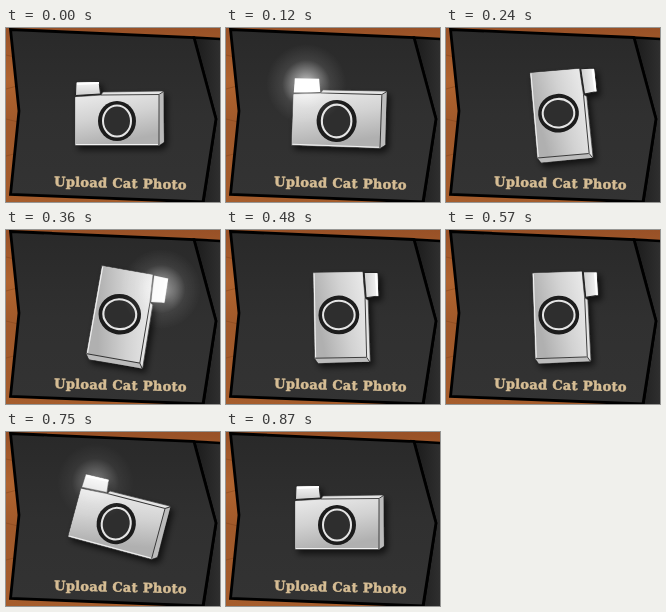
An HTML page that plays this animation: 214 by 174 pixels, repeating every 0.9 s.

```html
<!DOCTYPE html>
<html lang="en">
<head>
<meta charset="utf-8">
<title>Upload button</title>
<style>
html, body { margin: 0; width: 100%; height: 100%; overflow: hidden; background: #2f2f2f; }
svg { display: block; width: 100vw; height: 100vh; }
text { font: bold 13px "DejaVu Serif", "Noto Serif", serif; letter-spacing: .3px; }
</style>
</head>
<body>
<svg viewBox="0 0 214 174" preserveAspectRatio="none">
  <defs>
    <linearGradient id="wood" x2="0" y2="1">
      <stop offset="0" stop-color="#985127"/><stop offset=".3" stop-color="#b0642f"/>
      <stop offset=".55" stop-color="#a0592a"/><stop offset="1" stop-color="#a65d2c"/>
    </linearGradient>
    <linearGradient id="panel" x2="0" y2="1">
      <stop offset="0" stop-color="#292929"/><stop offset=".5" stop-color="#303030"/><stop offset="1" stop-color="#333"/>
    </linearGradient>
    <linearGradient id="next">
      <stop offset="0" stop-color="#1b1b1b"/><stop offset="1" stop-color="#303030"/>
    </linearGradient>
    <linearGradient id="metal" x2=".3" y2="1">
      <stop offset="0" stop-color="#ebebeb"/><stop offset=".5" stop-color="#d2d2d2"/>
      <stop offset="1" stop-color="#b0b0b0"/>
    </linearGradient>
    <linearGradient id="bulb" x2="0" y2="1">
      <stop offset="0" stop-color="#f7f7f7"/><stop offset="1" stop-color="#cfcfcf"/>
    </linearGradient>
    <radialGradient id="light">
      <stop offset="0" stop-color="#fff"/><stop offset=".3" stop-color="#fff" stop-opacity=".55"/>
      <stop offset=".6" stop-color="#fff" stop-opacity=".13"/><stop offset="1" stop-color="#fff" stop-opacity="0"/>
    </radialGradient>
    <filter id="shade" x="-30%" y="-30%" width="160%" height="160%">
      <feDropShadow dx="3" dy="4" stdDeviation="3" flood-color="#000" flood-opacity=".65"/>
    </filter>
  </defs>

  <rect width="214" height="174" fill="url(#wood)"/>
  <path d="M0 27L9 29M0 61L11 58M0 91L12 94M0 128L8 126" stroke="#7c4117" stroke-width=".7" opacity=".6"/>
  <path d="M188 9.500L216 11V176H197L210 91Z" fill="url(#next)" stroke="#000" stroke-width="2.500"/>
  <path d="M4.500 1.500L188 9.500L210 91L197 174L4.500 166.500L13 83Z" fill="url(#panel)" stroke="#000" stroke-width="2.800"/>

  <g filter="url(#shade)">
    <g id="camera">
      <path d="M70 54L93 53.500L94.500 66L69.500 67.500Z" fill="url(#bulb)" stroke="#222"/>
      <path d="M71 54.500L93 54V56L71 57Z" fill="#fff"/>
      <path d="M69 69L95 67L97 64L157 63L158 114L153 117.500H69Z" fill="#e4e4e4" stroke="#333" stroke-width=".6"/>
      <path d="M69.500 69L153 67V117H69.500Z" fill="url(#metal)"/>
      <path d="M153 67L157.500 63.500V114L153 117Z" fill="#bcbcbc"/>
      <path d="M95 67L153 66.500L157.500 63.500M153 67V117" fill="none" stroke="#333" stroke-width=".9"/>
      <path d="M70 116.500H152" stroke="#f2f2f2"/>
      <ellipse cx="111" cy="93" rx="19" ry="20" fill="#1b1b1b"/>
      <ellipse cx="111" cy="93" rx="14" ry="15.500" fill="#2d2d2d" stroke="#e4e4e4" stroke-width="2"/>
    </g>
  </g>
  <g id="flash">
    <circle cx="81" cy="59" r="38" fill="url(#light)" opacity=".75"/>
    <path d="M70 54L93 53.500L94.500 66L69.500 67.500Z" fill="#fff"/>
  </g>

  <text x="48" y="158" transform="rotate(1.500 48 158)" fill="#d6bd94" stroke="#d6bd94" stroke-width=".5">Upload Cat Photo</text>
</svg>
<script>
const LOOP = 900, STEP = 30, CX = 116, CY = 90;
const camera = document.getElementById("camera");
const flash = document.getElementById("flash");

// time, angle, scale, flash
const keys = [
  [0, 0, 1, 0], [60, 0, 1.02, .4], [120, 2, 1.055, 1], [180, 28, 1.02, .3],
  [240, 85, 1.02, 0], [300, 97, 1.04, .4], [360, 100, 1.065, .9], [420, 96, 1.04, .4],
  [480, 89, 1.02, 0], [570, 88, 1.02, 0], [660, 70, 1.01, 0], [720, 28, 1.01, .2],
  [780, 2, 1.05, .9], [840, 0, 1.01, .2], [870, 0, 1, 0], [900, 0, 1, 0]
];

function pose(t) {
  const i = keys.findIndex(k => k[0] > t);
  const a = keys[i - 1], b = keys[i];
  const p = (t - a[0]) / (b[0] - a[0]);
  return a.map((v, j) => v + (b[j] - v) * p);
}

function draw(now) {
  const t = Math.floor((now % LOOP) / STEP) * STEP;
  const [, angle, scale, glow] = pose(t);
  const move = `translate(${CX} ${CY}) rotate(${angle}) scale(${scale}) translate(${-CX} ${-CY})`;
  camera.setAttribute("transform", move);
  flash.setAttribute("transform", move);
  flash.setAttribute("opacity", glow);
  requestAnimationFrame(draw);
}
draw(0);
</script>
</body>
</html>
```
